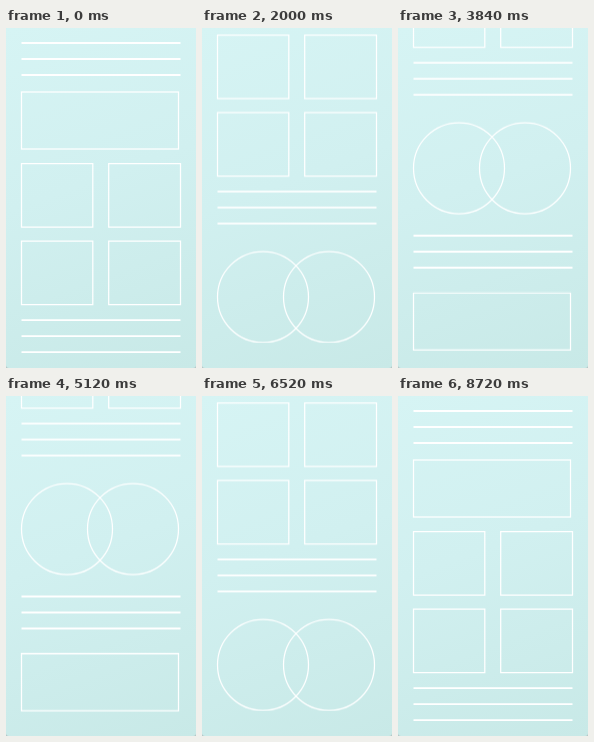
Recreate the animation shown at these times as an HTML page. Size 190 px wide and 340 px high, loop 9580 ms.

```html
<!DOCTYPE html>
<html lang="en">
<head>
<meta charset="utf-8">
<title>Scrolling wireframe</title>
<style>
  html, body { margin: 0; width: 100%; height: 100%; overflow: hidden; background: #b4c4c4; }
  .screen {
    position: absolute; inset: 0; overflow: hidden;
    border-radius: 0 0 3px 3px;
    background: linear-gradient(160deg, #d6f4f4 0%, #d1f0f0 45%, #c8e9e7 100%);
  }
  svg { display: block; width: 190px; height: 340px; fill: none; stroke: #fff; stroke-width: 1.25; }
  .lines { stroke-width: 1.8; }

  .page, .late { animation: 9580ms infinite; }
  .page { animation-name: scroll; animation-timing-function: ease; }
  .late { animation-timing-function: step-end; }
  .circles { animation-name: circles; }
  .notes { animation-name: notes; }
  .footer { animation-name: footer; }

  @keyframes scroll {
    0%, 6.367% { transform: translateY(0); }
    21.399%, 29.457% { transform: translateY(-128.6px); }
    44.489%, 53.34% { transform: translateY(-265px); }
    68.372%, 76.096% { transform: translateY(-128.6px); }
    91.127%, 100% { transform: translateY(0); }
  }

  /* Lower blocks show only while they fit wholly above the bottom edge. */
  @keyframes circles {
    0%, 78.36%, 100% { visibility: hidden; }
    14.05% { visibility: visible; }
  }
  @keyframes notes {
    0%, 60.44%, 100% { visibility: hidden; }
    32.05% { visibility: visible; }
  }
  @keyframes footer {
    0%, 55.55%, 100% { visibility: hidden; }
    37.28% { visibility: visible; }
  }
</style>
</head>
<body>
<div class="screen">
  <svg viewBox="0 0 190 340">
    <defs>
      <path id="lines" class="lines" d="M15.5 0H174.5M15.5 16H174.5M15.5 32H174.5"/>
      <rect id="banner" x="15.5" width="157" height="57"/>
      <path id="pair" d="M15.5 0h71.3v63.5h-71.3zM102.7 0h71.8v63.5h-71.8z"/>
    </defs>
    <g class="page">
      <use href="#lines" y="15"/>
      <use href="#banner" y="64"/>
      <use href="#pair" y="135.5"/>
      <use href="#pair" y="213"/>
      <use href="#lines" y="292.2"/>
      <g class="late circles">
        <circle cx="61" cy="397.6" r="45.5"/>
        <circle cx="127" cy="397.6" r="45.5"/>
      </g>
      <use class="late notes" href="#lines" y="465"/>
      <use class="late footer" href="#banner" y="522.3"/>
    </g>
  </svg>
</div>
</body>
</html>
```
